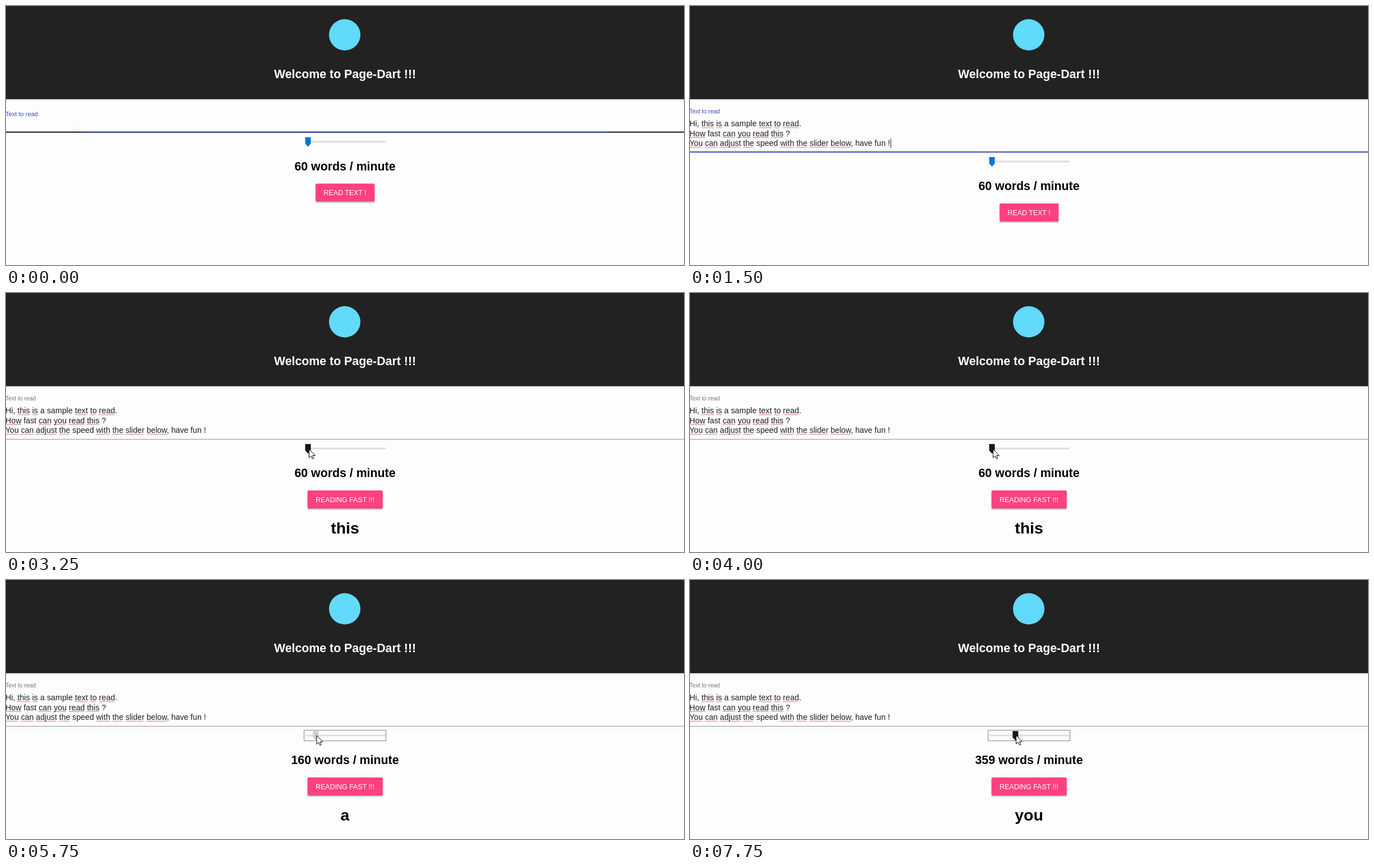
Recreate the animation shown at these times as an HTML page. Size 1209 px wide and 463 px high, loop 8000 ms.

```html
<!DOCTYPE html>
<html lang="en">
<head>
<meta charset="utf-8">
<title>Reading speed trainer</title>
<style>
  html, body { margin: 0; width: 100%; height: 100%; overflow: hidden; background: #fdfdfd; }
  svg { display: block; width: 100%; height: 100%; font-family: "Liberation Sans", Arial, sans-serif; }
  .mid { text-anchor: middle; }
  .bold { font-weight: bold; }
</style>
</head>
<body>
<svg id="stage" viewBox="0 0 1209 463">
  <defs>
    <filter id="shadow" x="-10%" y="-30%" width="120%" height="180%">
      <feDropShadow dx="0" dy="1.6" stdDeviation="1.3" flood-color="#000" flood-opacity=".38"/>
    </filter>
  </defs>
  <rect width="1209" height="463" fill="#fdfdfd"/>
  <rect width="1209" height="166.7" fill="#222"/>
  <circle cx="604" cy="51.5" r="28" fill="#61dafb"/>
  <text class="mid bold" x="604.5" y="129" font-size="21.33" fill="#fff">Welcome to Page-Dart !!!</text>

  <text id="label" x="-1">Text to read</text>
  <g id="lines" fill="#1f1f1f"></g>
  <rect id="caret" width="1" height="17" fill="#111"/>
  <path id="beam" d="M128.500 214V230" stroke="#f3ecc8"/>

  <g id="form">
    <rect id="rule" width="1209"/>
    <rect id="focus" y="260" height="2" fill="#3f51b5"/>
    <rect x="534" y="276.500" width="143" height="3" fill="#dedee2"/>
    <rect id="ring" x="531.500" y="268.500" width="146" height="19" fill="none" stroke="#111" stroke-dasharray="1 1"/>
    <path id="thumb" d="M0 270h10v11.500l-5 5.500-5-5.500z"/>
    <text id="speed" class="mid bold" x="604.500" y="329" font-size="21.33"></text>
    <rect id="button" y="353" height="32" rx="1.800" filter="url(#shadow)"/>
    <text id="caption" class="mid" x="604.500" y="373.500" font-size="12.44" fill="#fff"></text>
  </g>
  <text id="word" class="mid bold" x="604.500" y="430" font-size="28.44"></text>

  <g stroke="#000" fill="#fff" stroke-linejoin="round">
    <path id="arrow" d="M0 0V15.500L3.600 12.300 6 17.600 8.300 16.600 6 11.500H10.800Z"/>
    <path id="hand" d="M-1.500 12V1.800a1.600 1.600 0 0 1 3.200 0V7l6 1.500a2.400 2.400 0 0 1 2 2.400c0 4-.8 5.500-2 7.500V20.500H.5V18.500L-5.200 12.300a1.400 1.400 0 0 1 2-1.900z"/>
  </g>
</svg>
<script>
const LOOP = 8000, STEP = 250, MID = 604.5, NS = 'http://www.w3.org/2000/svg';
const el = {};
document.querySelectorAll('[id]').forEach(e => el[e.id] = e);

// Words marked with * carry a spelling squiggle
const ROWS = [
  ['Hi, *this *is a sample *text *to *read.', 215, 14.3],
  ['*How fast *can *you *read *this ?', 232.5, 14.22],
  ['*You *can *adjust *the speed *with *the *slider *below, have fun !', 250, 14.1]
];
const WORDS = ROWS.map(r => r[0]).join(' ').replace(/\*/g, '').split(' ');

// [time, shape, x, y] of the pointer
const POINTER = [
  [0, ''], [1750, 'hand', 608, 362], [2000, 'hand', 617, 357.5],
  [2750, 'arrow', 575, 312], [3000, 'arrow', 540.5, 279],
  [5750, 'arrow', 554, 278], [6000, 'arrow', 572, 278], [6250, 'arrow', 581.5, 277.5]
];
// [time, words per minute]
const SPEEDS = [[0, 60], [5750, 160], [6000, 290], [6250, 359]];

const latest = (keys, t) => keys.filter(k => k[0] <= t).pop();
const show = (e, on) => e.setAttribute('visibility', on ? 'visible' : 'hidden');

function set(e, attrs) {
  for (const k in attrs) e.setAttribute(k, attrs[k]);
  return e;
}

function add(parent, tag, attrs) {
  return parent.appendChild(set(document.createElementNS(NS, tag), attrs));
}

function squiggle(x1, x2, y) {
  let d = `M${x1} ${y + 2}`;
  for (let x = x1 + 2, up = true; x <= x2; x += 2, up = !up) d += `L${x} ${up ? y : y + 2}`;
  add(el.lines, 'path', { d, fill: 'none', stroke: '#c23b3b', 'stroke-width': .8 });
}

let textEnd = 0;
for (const [row, y, size] of ROWS) {
  const text = add(el.lines, 'text', { x: -1, y, 'font-size': size });
  text.textContent = row.replace(/\*/g, '');
  let at = 0;
  for (const part of row.split(' ')) {
    const word = part.replace('*', '');
    if (part !== word) {
      const last = at + word.replace(/[.,]/, '').length - 1;
      squiggle(text.getStartPositionOfChar(at).x, text.getEndPositionOfChar(last).x, y + 1.5);
    }
    at += word.length + 1;
  }
  textEnd = text.getComputedTextLength();
}

function wordAt(t) {
  if (t < 2250) return '';
  if (t < 6460) return WORDS[Math.min(3, Math.floor((t - 2250) / 1000))];
  return WORDS[4 + Math.floor((t - 6460) * 359 / 60000)];
}

function draw(now) {
  const t = Math.floor(now % LOOP / STEP) * STEP;
  const filled = t >= 500, blurred = t >= 2250, reading = t >= 2250;
  const [, shape, px, py] = latest(POINTER, t);
  const wpm = latest(SPEEDS, t)[1];

  // Text field
  set(el.label, {
    y: t < 250 ? 197 : 191.5,
    'font-size': t < 250 ? 11.1 : 10.4,
    fill: blurred ? '#757575' : '#3449d0'
  });
  show(el.lines, filled);
  show(el.beam, t < 250);
  show(el.caret, !blurred && t >= 250 && t % 1000 >= 500);
  set(el.caret, { x: filled ? textEnd : 0, y: filled ? 237 : 201.5 });
  set(el.form, { transform: `translate(0 ${filled ? 0 : -35.5})` });
  set(el.rule, blurred ? { y: 261, height: 1, fill: '#949494' } : { y: 260, height: 2, fill: '#111' });
  const half = t < 250 ? 469.5 : t < 2250 ? MID : t < 2500 ? 32 : 0;
  set(el.focus, { x: MID - half, width: half * 2 });

  // Slider
  const held = t >= 5500 && t < 7000;
  show(el.ring, t >= 5500);
  set(el.thumb, {
    transform: `translate(${533.5 + (wpm - 60) / 940 * 131.5} 0)`,
    fill: held ? '#ccc' : t >= 3000 ? '#171717' : '#0078d7'
  });
  el.speed.textContent = wpm + ' words / minute';

  // Button and current word
  const width = reading ? 134 : 105;
  set(el.button, { x: MID + .2 - width / 2, width, fill: shape === 'hand' ? '#ff3376' : '#ff4081' });
  el.caption.textContent = reading ? 'READING FAST !!!' : 'READ TEXT !';
  el.word.textContent = wordAt(t);

  for (const name of ['arrow', 'hand']) {
    show(el[name], shape === name);
    if (shape === name) set(el[name], { transform: `translate(${px} ${py})` });
  }
}

const start = performance.now();
function tick() {
  draw(performance.now() - start);
  requestAnimationFrame(tick);
}
tick();
</script>
</body>
</html>
```
